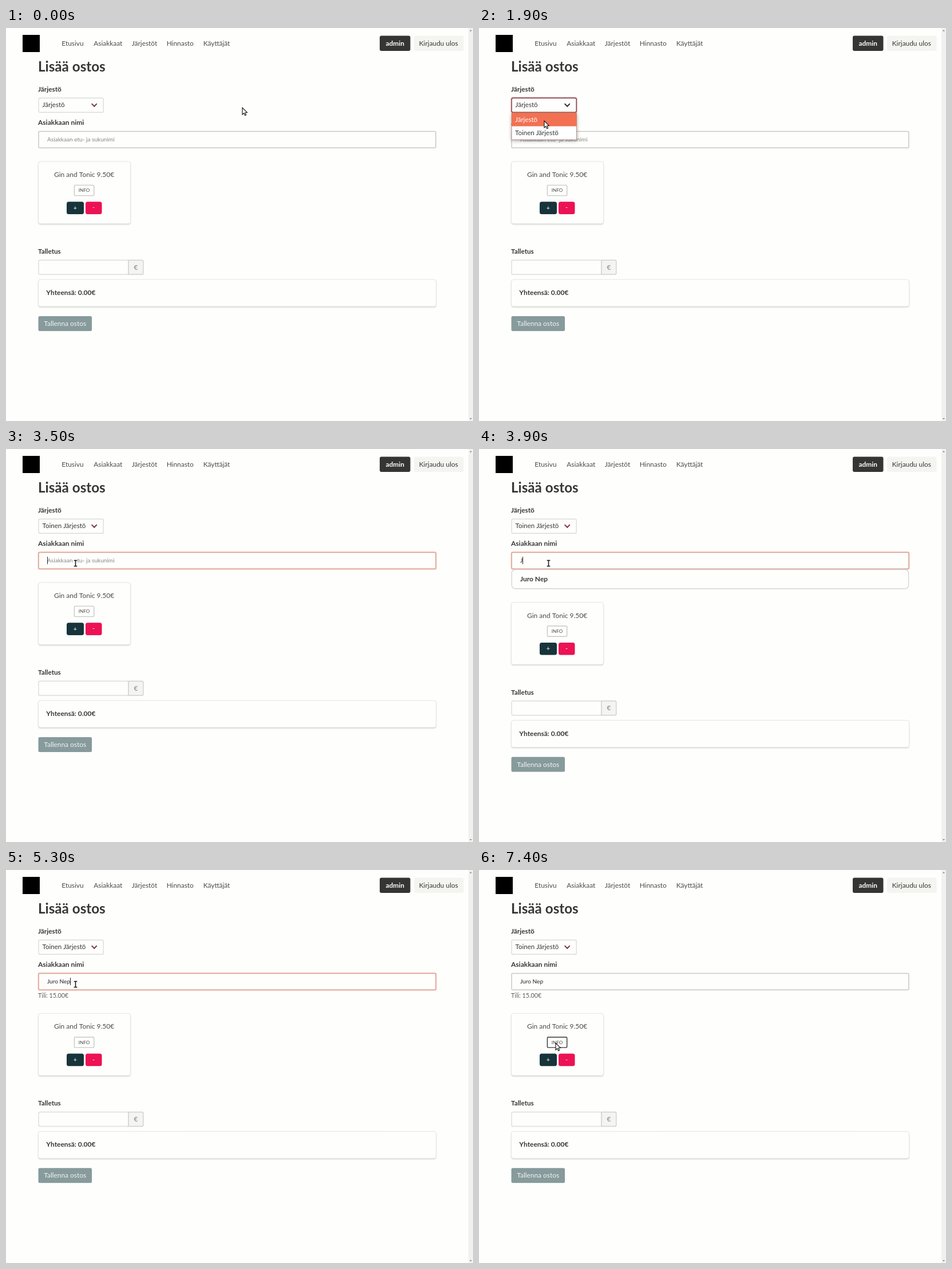
Write an HTML page with a canvas that moves like this. It is 816 px wide and 686 px high and loops after 8 s.

```html
<!DOCTYPE html>
<html lang="fi">
<head>
<meta charset="utf-8">
<title>Lisää ostos</title>
<style>
  html, body { margin: 0; width: 100%; height: 100%; overflow: hidden; background: #fefffc; }
  canvas { display: block; }
</style>
</head>
<body>
<canvas id="stage" width="816" height="686"></canvas>
<script>
const ctx = document.getElementById('stage').getContext('2d');
const LOOP = 8000;
const PAGE = '#fefffc', INK = '#363636', TEXT = '#4a4a4a', LINE = '#dcdedb', GREY = '#c6c9c6';
const MAROON = '#7c3644', SALMON = '#e09a8c', CORAL = '#f27152';
const NAME = 'Juro Nep';

// Pointer stops: time, x, y, shape
const pointer = [
  [0, 413, 139, 'arrow'],
  [600, 385, 138, 'arrow'], [700, 318, 135, 'arrow'], [800, 240, 131, 'arrow'],
  [900, 185, 128, 'arrow'], [1000, 163, 126, 'hand'],
  [1900, 114, 162, 'arrow'], [2000, 160, 180, 'arrow'],
  [2200, 130, 178, 'arrow'], [2300, 103, 174, 'arrow'],
  [2700, 104, 174, 'hand'],
  [3000, 107, 180, 'beam'], [3100, 116, 193, 'beam'], [3200, 121.5, 199.5, 'beam'],
  [6000, 119, 204, 'beam'], [6100, 110, 214, 'arrow'], [6200, 95, 236, 'arrow'],
  [6300, 80, 260, 'arrow'], [6400, 68, 282, 'arrow'], [6500, 63, 297, 'arrow'],
  [6600, 81, 302, 'arrow'], [6700, 106, 303, 'arrow'], [6800, 128, 301, 'arrow'],
  [6900, 131, 302, 'arrow'], [7000, 134, 302, 'arrow']
];

function text(str, x, y, size = 11.9, color = TEXT, weight = 400, align = 'left') {
  ctx.font = `${weight} ${size}px Lato, "Open Sans", sans-serif`;
  ctx.fillStyle = color;
  ctx.textAlign = align;
  ctx.fillText(str, x, y);
}

function box(x, y, w, h, r, fill, stroke, width = 1) {
  ctx.beginPath();
  ctx.roundRect(x, y, w, h, r);
  if (fill) { ctx.fillStyle = fill; ctx.fill(); }
  if (stroke) { ctx.strokeStyle = stroke; ctx.lineWidth = width; ctx.stroke(); }
}

function shadow(color, blur, dy, draw) {
  ctx.save();
  ctx.shadowColor = color;
  ctx.shadowBlur = blur;
  ctx.shadowOffsetY = dy;
  draw();
  ctx.restore();
}

function card(x, y, w, h) {
  shadow('rgba(10,10,10,.2)', 2.5, 1.4, () => box(x, y, w, h, 4, PAGE));
  box(x, y, w, h, 4, PAGE, '#e3e6e2');
}

function poly(points, fill, stroke, width = 1) {
  ctx.beginPath();
  points.forEach(([x, y]) => ctx.lineTo(x, y));
  if (fill) { ctx.closePath(); ctx.fillStyle = fill; ctx.fill(); }
  if (stroke) { ctx.strokeStyle = stroke; ctx.lineWidth = width; ctx.stroke(); }
}

function header() {
  box(29, 12, 30, 30, 0, '#000');
  [['Etusivu', 116.5], ['Asiakkaat', 178.3], ['Järjestöt', 242], ['Hinnasto', 304.2], ['Käyttäjät', 368]]
    .forEach(([label, x]) => text(label, x, 30.8, 11.9, TEXT, 400, 'center'));
  box(653, 13.5, 53.5, 26.5, 3, '#353533');
  text('admin', 679.7, 30.8, 11.9, '#fff', 700, 'center');
  box(713, 13.5, 86.5, 26.5, 3, '#f4f4f1');
  text('Kirjaudu ulos', 755.8, 30.8, 11.9, INK, 400, 'center');
  text('Lisää ostos', 56, 75.8, 24.2, INK, 700);
  text('Järjestö', 56, 111, 11.8, INK, 700);
  text('Asiakkaan nimi', 56, 168.7, 12, INK, 700);
}

function scrollbar() {
  box(808, 0, 8, 686, 0, '#f1f1ef');
  poly([[810, 5.5], [814, 5.5], [812, 3]], '#888');
  poly([[810, 681], [814, 681], [812, 683.5]], '#888');
}

function picker(t) {
  const focus = t >= 1400 && t < 3500;
  const hover = t >= 1000 && t < 2700;
  if (focus) box(56.8, 122, 113.6, 25.3, 3, null, 'rgba(214,90,90,.28)', 4);
  box(57, 122.2, 113.2, 25, 2.5, PAGE, focus ? MAROON : hover ? '#b5b5b5' : LINE, 1.4);
  text(t < 2700 ? 'Järjestö' : 'Toinen Järjestö', 63.5, 138.3, 11.55, INK);
  ctx.lineCap = 'round';
  poly([[150.2, 132.6], [154.2, 136.8], [158.2, 132.6]], null, hover ? '#2e2e2e' : MAROON, 2);
  ctx.lineCap = 'butt';
}

function dropdown(t) {
  if (t < 1400 || t >= 2700) return;
  shadow('rgba(0,0,0,.35)', 6, 1.5, () => box(57, 148, 113.5, 47, 0, '#fff'));
  box(57, 148, 113.5, 47, 0, '#fff', '#bd8f8a', 1);
  const second = t >= 2000;
  box(57, second ? 171.5 : 148, 113.5, 23.5, 0, CORAL);
  text('Järjestö', 63, 164, 11.55, second ? INK : '#fff');
  text('Toinen Järjestö', 63, 187, 11.55, second ? '#fff' : INK);
}

function nameField(t) {
  const focus = t >= 3500 && t < 7400;
  if (focus) box(56.7, 180, 694.8, 29.6, 2, null, 'rgba(240,130,110,.22)', 3);
  box(57, 180.4, 694, 28.8, 2, PAGE, focus ? SALMON : GREY, 1.5);

  const count = t < 3900 ? 0 : t < 4200 ? 1 : t < 5300 ? 2 : NAME.length;
  const typed = NAME.slice(0, count);
  if (typed) text(typed, 72, 198, 10.1, '#222');
  else text('Asiakkaan etu- ja sukunimi', 72, 198, 10.1, '#858585');

  const blink = (t >= 4700 && t < 4900) || (t >= 5500 && t < 6000);
  if (focus && !blink) {
    const x = Math.round(72 + ctx.measureText(typed).width * (count > 0));
    box(x, 188, 1, 13, 0, '#222');
  }

  if (t >= 3900 && t < 5300) {
    box(57.2, 210.5, 693.4, 33.2, 6, PAGE, '#d3d6d3', 1.4);
    if (t >= 4900) box(65, 218, 678, 18, 2, '#f1f1ef');
    text(NAME, 72, 231, 12, INK, 700);
  }
  if (t >= 5300) text('Tili: 15.00€', 56, 222.5, 10.75, '#5c5c5c');
}

function lowerForm(t) {
  ctx.save();
  ctx.translate(0, t < 3900 ? 0 : t < 5300 ? 34.6 : 17.3);
  card(56.5, 233, 161, 108.5);
  text('Gin and Tonic 9.50€', 136.6, 260, 12, TEXT, 400, 'center');
  const hover = t >= 6800;
  box(119.4, 274.4, 34.3, 18.2, 1.5, PAGE, hover ? INK : GREY, 1.4);
  text('INFO', 136.5, 286.4, 8.2, TEXT, 400, 'center');
  box(106, 303.3, 30, 21.7, 3.5, '#17343a');
  box(139, 303.3, 28.5, 21.7, 3.5, '#ec1254');
  text('+', 121, 317.6, 10.8, '#fff', 400, 'center');
  text('-', 153, 317.4, 10.8, '#fff', 400, 'center');

  text('Talletus', 56, 394, 11.7, INK, 700);
  box(57, 405.2, 157, 25, 2.5, PAGE, LINE, 1.4);
  box(214, 405.2, 25.8, 25, [0, 2.5, 2.5, 0], '#f4f4f1', '#cfd2ce', 1.4);
  text('€', 227, 421.6, 11.9, '#808080', 400, 'center');

  card(56.5, 439, 695, 47);
  text('Yhteensä: 0.00€', 70.3, 466, 11.95, INK, 700);
  box(56.5, 503, 93.5, 26, 2.5, '#879a9c');
  text('Tallenna ostos', 103.2, 520, 11.9, '#f1f5f4', 400, 'center');
  ctx.restore();
}

const shapes = {
  arrow() {
    poly([[0, 0], [0, 12], [2.8, 9.6], [4.6, 13.6], [6.6, 12.7], [4.9, 8.8], [8.4, 8.6], [0, 0], [0, 2]], '#fff', '#111', 1.1);
  },
  hand() {
    ctx.lineJoin = 'round';
    poly([[-1, 0.5], [0.6, 0.5], [0.9, 4.4], [6, 5.2], [7.2, 6.6], [6.8, 10.8], [-1.2, 10.8],
      [-4.2, 7], [-3.6, 6], [-1, 7], [-1, 0.5]], '#fff', '#111', 1.2);
    poly([[2.8, 5], [2.8, 7]], null, '#111', .8);
    poly([[4.8, 5.2], [4.8, 7]], null, '#111', .8);
    ctx.lineJoin = 'miter';
  },
  beam() {
    const bar = (color, width) => {
      poly([[-2.8, -5], [2.8, -5]], null, color, width);
      poly([[0, -5], [0, 5]], null, color, width);
      poly([[-2.8, 5], [2.8, 5]], null, color, width);
    };
    bar('#fff', 3.2);
    bar('#111', 1.5);
  }
};

function drawPointer(t) {
  const [, x, y, shape] = pointer.findLast(stop => stop[0] <= t);
  ctx.save();
  ctx.translate(x, y);
  shapes[shape]();
  ctx.restore();
}

function frame(now) {
  const t = now % LOOP;
  box(0, 0, 816, 686, 0, PAGE);
  header();
  scrollbar();
  lowerForm(t);
  nameField(t);
  picker(t);
  dropdown(t);
  drawPointer(t);
  requestAnimationFrame(frame);
}
requestAnimationFrame(frame);
</script>
</body>
</html>
```
